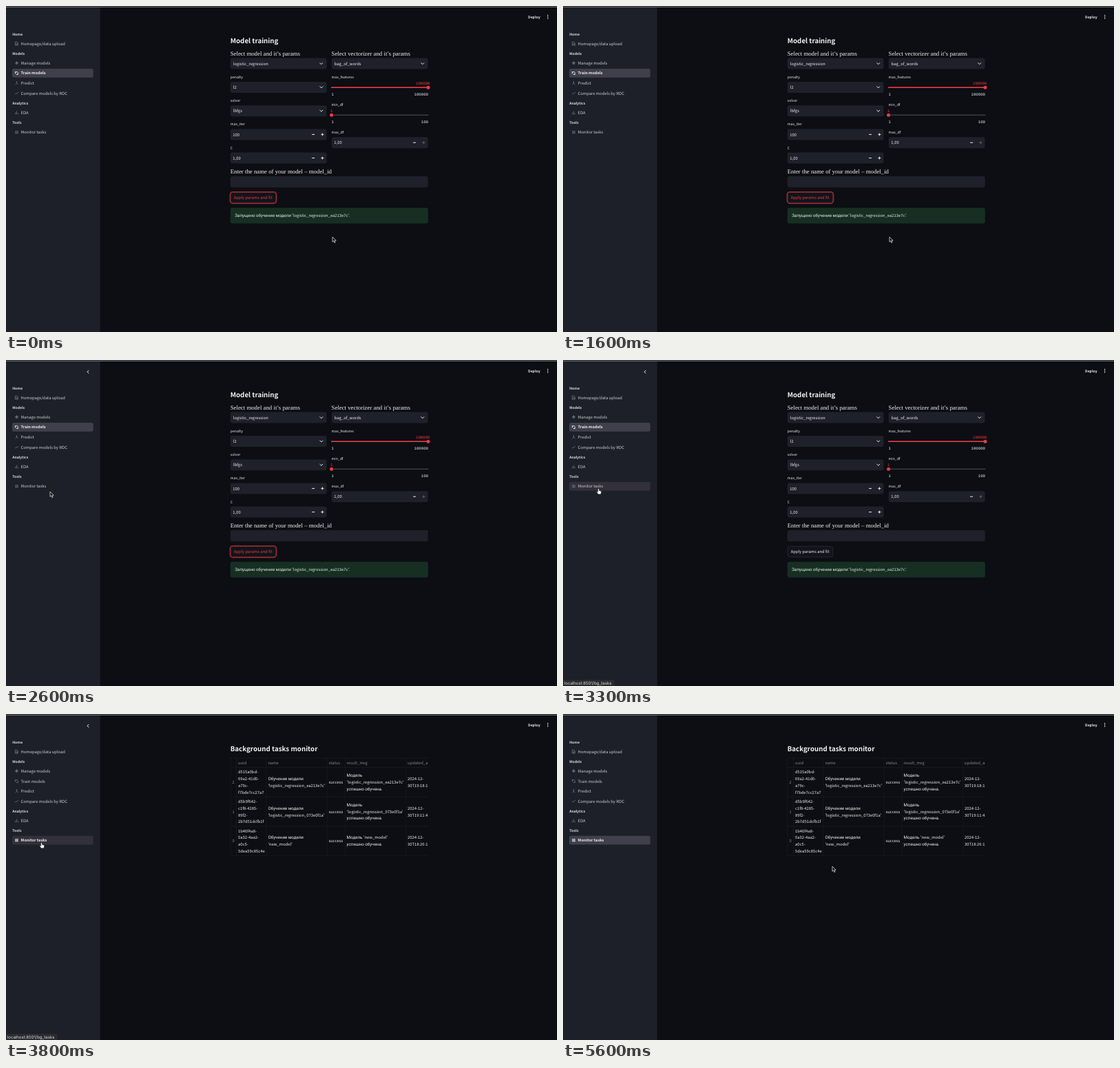
These frames come from a looping animation (800 by 473 pixels, 5800 ms). An HTML page:

```html
<!DOCTYPE html>
<html lang="en">
<head>
<meta charset="utf-8">
<title>Model training</title>
<style>
html, body { margin: 0; width: 100%; height: 100%; overflow: hidden; background: #0c0e13; }
svg { display: block; width: 800px; height: 473px; text-rendering: geometricPrecision; }
text { white-space: pre; font-family: "Noto Sans CJK JP", "Noto Sans CJK SC", "Noto Sans", sans-serif; }
.serif { font-family: "Liberation Serif", "Noto Serif", serif; }
.mono { font-family: "Liberation Mono", "Noto Sans Mono", monospace; }
.ui { font-family: Inter, "Open Sans", sans-serif; }
.cyr { font-family: Roboto, "Noto Sans", sans-serif; }
.bold { font-weight: 700; }
</style>
</head>
<body>
<svg id="stage" viewBox="0 0 800 473"></svg>
<script>
const LOOP = 5800, STEP = 100;
const WHITE = '#f0f0f2', RED = '#f03a40', FIELD = '#1f212a', BODY = 5.83, LABEL = 5.12;
const stage = document.getElementById('stage');

// y is the middle of the capitals
function text(x, y, str, { size = BODY, fill = WHITE, cls = '', anchor = 'start' } = {}) {
  const inner = str.replace(/[А-я]+/g, s =>
    `<tspan class="cyr" font-size="${size * 1.075}">${s}</tspan>`);
  return `<text x="${x}" y="${y + size * 0.37}" font-size="${size}" fill="${fill}" class="${cls}" text-anchor="${anchor}">${inner}</text>`;
}
const rect = (x, y, w, h, fill, r = 0, more = '') =>
  `<rect x="${x}" y="${y}" width="${w}" height="${h}" rx="${r}" fill="${fill}" ${more}/>`;
const line = (d, color = WHITE, width = 1) =>
  `<path d="${d}" fill="none" stroke="${color}" stroke-width="${width}" stroke-linecap="round" stroke-linejoin="round"/>`;
const dot = (x, y, r, fill) => `<circle cx="${x}" cy="${y}" r="${r}" fill="${fill}"/>`;
const label = (x, y, str) => text(x, y, str, { size: LABEL });
const heading = (x, y, str) => text(x, y, str, { size: 8.8, cls: 'serif' });
const title = str => text(325.7, 50.2, str, { size: 9.75, cls: 'bold' });

function select(x, y, value) {
  return rect(x, y - 8, 139.8, 16, FIELD, 3) + text(x + 4, y, value) +
    line(`M${x + 130} ${y - 1}l2 2 2-2`);
}
function number(x, y, value, plus = WHITE) {
  return rect(x, y - 8, 139.8, 16, FIELD, 3) + text(x + 3.5, y, value) +
    line(`M${x + 118.7} ${y}h3.2`) + line(`M${x + 132} ${y}h3.2m-1.6-1.6v3.2`, plus);
}
function slider(y, at, value, max) {
  const mono = { size: 5.7, cls: 'mono' }, left = 472.6, right = 613;
  return line(`M${left} ${y}H${right}`, '#3a3c44', 1.5) +
    (at > left ? line(`M${left} ${y}H${at}`, RED, 1.5) : '') + dot(at, y, 2.5, RED) +
    text(at > left ? 615.5 : at, y - 6.6, value,
      { ...mono, fill: RED, anchor: at > left ? 'end' : 'middle' }) +
    text(472.6, y + 9.3, '1', mono) + text(right, y + 9.3, max, { ...mono, anchor: 'end' });
}

const groups = [['Home', 41], ['Models', 69], ['Analytics', 141.3], ['Tools', 169.6]];
const links = [
  ['Homepage/data upload', 54.6, 'M-1.8-2.4h2.4l1.3 1.3v3.5h-3.7zM-.8.2h1.7M-.8 1.3h1.7'],
  ['Manage models', 82.7, 'M-1.5-1.5l3 3m0-3l-3 3M0-2.2v4.4M-2.2 0h4.4'],
  ['Train models', 97.4, 'M-2 .7a2.1 2.1 0 0 1 3.3-2.2M2.1-.5a2.1 2.1 0 0 1-2.2 2.6M-2.4-1.6h1.5M.9 1.7h1.3'],
  ['Predict', 112, 'M0-2v2l-1.8 1.8M0 0l1.8 1.8M-.4-2h.8'],
  ['Compare models by ROC', 126.7, 'M-2.2 1.2l1.4-1.4 1 .8 2-2'],
  ['EDA', 154.9, 'M-1.8 2v-2M0 2v-4M1.8 2v-1.2'],
  ['Monitor tasks', 183.2, 'M-2-1.5h4M-2 0h4M-2 1.5h4']
];

function sidebar(active, hovered, open) {
  let out = rect(0, 0, 136.7, 473, '#1d2029');
  for (const [name, y] of groups) out += text(9.2, y, name, { size: LABEL, cls: 'bold', fill: '#dcdde0' });
  for (const [name, y, icon] of links) {
    const on = name === active, hover = name === hovered;
    if (on || hover) out += rect(9, y - 6.4, 117.7, 12.8, hover ? '#32313b' : '#3f404b', 2.5);
    out += `<g transform="translate(15.5 ${y})">${line(icon, on ? WHITE : '#858790', on ? 0.9 : 0.65)}</g>`;
    out += text(21.6, y, name, { cls: on ? 'bold' : '', fill: on ? WHITE : '#cccdd1', size: on ? 5.65 : BODY });
  }
  return out + (open ? line('M120 15.2l-2 2 2 2', WHITE, 1) : '');
}

function training(focused) {
  const edge = focused ? RED : '#34363d';
  return title('Model training') +
    heading(325.7, 68.4, 'Select model and it’s params') +
    heading(472.5, 68.4, 'Select vectorizer and it’s params') +
    select(325.8, 83.6, 'logistic_regression') + select(472.8, 83.6, 'bag_of_words') +
    label(325.8, 103.2, 'penalty') + select(325.8, 117.9, 'l2') +
    label(325.8, 137.3, 'solver') + select(325.8, 152.2, 'lbfgs') +
    label(325.8, 171.6, 'max_iter') + number(325.8, 186.4, '100') +
    label(325.8, 205.8, 'C') + number(325.8, 220.6, '1,00') +
    label(472.6, 103.2, 'max_features') + slider(118.2, 613, '100000', '100000') +
    label(472.6, 143, 'min_df') + slider(158.2, 472.6, '1', '100') +
    label(472.6, 183.3, 'max_df') + number(472.8, 198.2, '1,00', '#62646b') +
    heading(325.7, 240, 'Enter the name of your model – model_id') +
    rect(325.8, 247, 287, 16.2, FIELD, 3) +
    (focused ? rect(325.2, 269.6, 67.6, 17, 'none', 4, 'stroke="#7d2a30" stroke-width="1.2"') : '') +
    rect(326, 270.3, 66, 15.6, '#11141b', 3, `stroke="${edge}" stroke-width=".6"`) +
    text(330.8, 278.2, 'Apply params and fit', { fill: focused ? RED : WHITE }) +
    rect(325.8, 292.8, 287, 22.7, '#172f23', 3) +
    text(332.3, 304.2, "Запущено обучение модели 'logistic_regression_ea213e7c'.", { fill: '#dcf2e2' });
}

const columns = [[337, 'uuid'], [380.4, 'name'], [468.6, 'status'], [494.6, 'result_msg'], [583, 'updated_a']];
const tasks = [
  ['2', 'd515a0bd-|69a2-41d0-|a79c-|f7bde7cc27a7', 'logistic_regression_ea213e7c', '30T19:18:1'],
  ['1', 'd5b9f642-|c1f8-4285-|89f2-|2b7d51dcfb1f', 'logistic_regression_073e0f1a', '30T19:11:4'],
  ['0', '1b46f4a8-|0a32-4aa2-|a0c5-|5dea59c85c4e', 'new_model', '30T18:26:1']
];

function cell(x, mid, str) {
  const rows = str.split('|');
  return rows.map((s, i) => text(x, mid + (i - (rows.length - 1) / 2) * 9.78, s)).join('');
}
function table() {
  const grey = { fill: '#85878d' }, border = '#1d1f25';
  let out = '';
  for (const y of [64, 77.5, 120.2, 162.9, 205.6]) out += line(`M325.8 ${y}H612.8`, border, 0.6);
  for (const x of [326, 334.5, 378, 466.2, 492.3, 580.8]) out += line(`M${x} 64V205.6`, border, 0.6);
  for (const [x, name] of columns) out += text(x, 70.8, name, grey);
  tasks.forEach(([id, uuid, model, time], i) => {
    const y = 98.8 + i * 42.7;
    const result = i < 2 ? `Модель|'${model}'|успешно обучена.` : `Модель '${model}'|успешно обучена.`;
    const values = [uuid, `Обучение модели|'${model}'`, 'success', result, '2024-12-|' + time];
    out += text(328.4, y, id, grey);
    values.forEach((v, k) => out += cell(columns[k][0], y, v));
  });
  return out;
}

const path = [
  [0, 474, 335], [1600, 474, 335], [1700, 466, 331], [1800, 424, 316], [1900, 345, 290],
  [2000, 250, 256], [2200, 112, 210], [2300, 84, 199], [2500, 67, 192], [2600, 64, 191],
  [3000, 51.7, 186.6], [4300, 51.7, 186.6], [4400, 70, 190], [4600, 178.5, 201],
  [4800, 298, 218], [4900, 338, 220], [5100, 360, 220.5], [5300, 360, 220.5],
  [5500, 384, 221], [5600, 391, 221], [LOOP, 391, 221]
];
function pointer(t, hand) {
  const i = path.findIndex(p => p[0] > t);
  const [t0, x0, y0] = path[i - 1], [t1, x1, y1] = path[i];
  const k = (t - t0) / (t1 - t0);
  const at = `translate(${x0 + (x1 - x0) * k} ${y0 + (y1 - y0) * k})`;
  return hand
    ? `<path transform="${at}" d="M-1 1a.9.9 0 0 1 1.8 0V3l2.5.6q.8.2.7 1l-.4 2-.6 1.6h-3.6L-2.8 5q-.3-.9.6-.8l1.2.8z" fill="#fff" stroke="#111" stroke-width=".5"/>`
    : `<path transform="${at}" d="M0 0V7.3L1.7 5.8 2.9 8.5 4.1 8 2.9 5.3H5.2Z" fill="#111" stroke="#eee" stroke-width=".7" stroke-linejoin="round"/>`;
}

function scene(t) {
  const first = t < 3400;
  const hover = t >= 2900 && t < 4400;
  let out = rect(0, 0, 800, 473, '#0c0e13') +
    sidebar(first ? 'Train models' : 'Monitor tasks', hover ? 'Monitor tasks' : '', t >= 2200 && t < 4600) +
    rect(0, 0, 800, 1, '#1a1c1f') + rect(0, 1, 800, 1, '#727673');
  if (t >= 3400 && t < 3600) {
    out += line('M690 12.5l6 6m0-6l-6 6M689.5 18.8h7', '#393b41', 0.9) +
      text(701, 15.8, 'RUNNING...', { size: LABEL, fill: '#3d3f45' }) +
      text(736.8, 15.8, 'Stop', { size: LABEL, fill: '#6a6c72' });
  }
  out += text(758, 15.8, 'Deploy', { size: 5.1, cls: 'bold' });
  for (const y of [13.6, 15.8, 18]) out += dot(786.6, y, 0.75, WHITE);
  out += first ? training(t < 3300) : title('Background tasks monitor');
  if (t >= 3500) out += table();
  if (t >= 3200 && t < 5000) {
    out += rect(-3, 464, 77.5, 12, '#292b2f', 2) +
      text(1.8, 468.6, 'localhost:8501/bg_tasks', { size: 6.05, cls: 'ui', fill: '#dedee0' });
  }
  return out + pointer(t, hover);
}

let shown = -1;
function play(now) {
  const t = Math.floor(now % LOOP / STEP) * STEP;
  if (t !== shown) stage.innerHTML = scene(shown = t);
  requestAnimationFrame(play);
}
play(performance.now());
</script>
</body>
</html>
```
